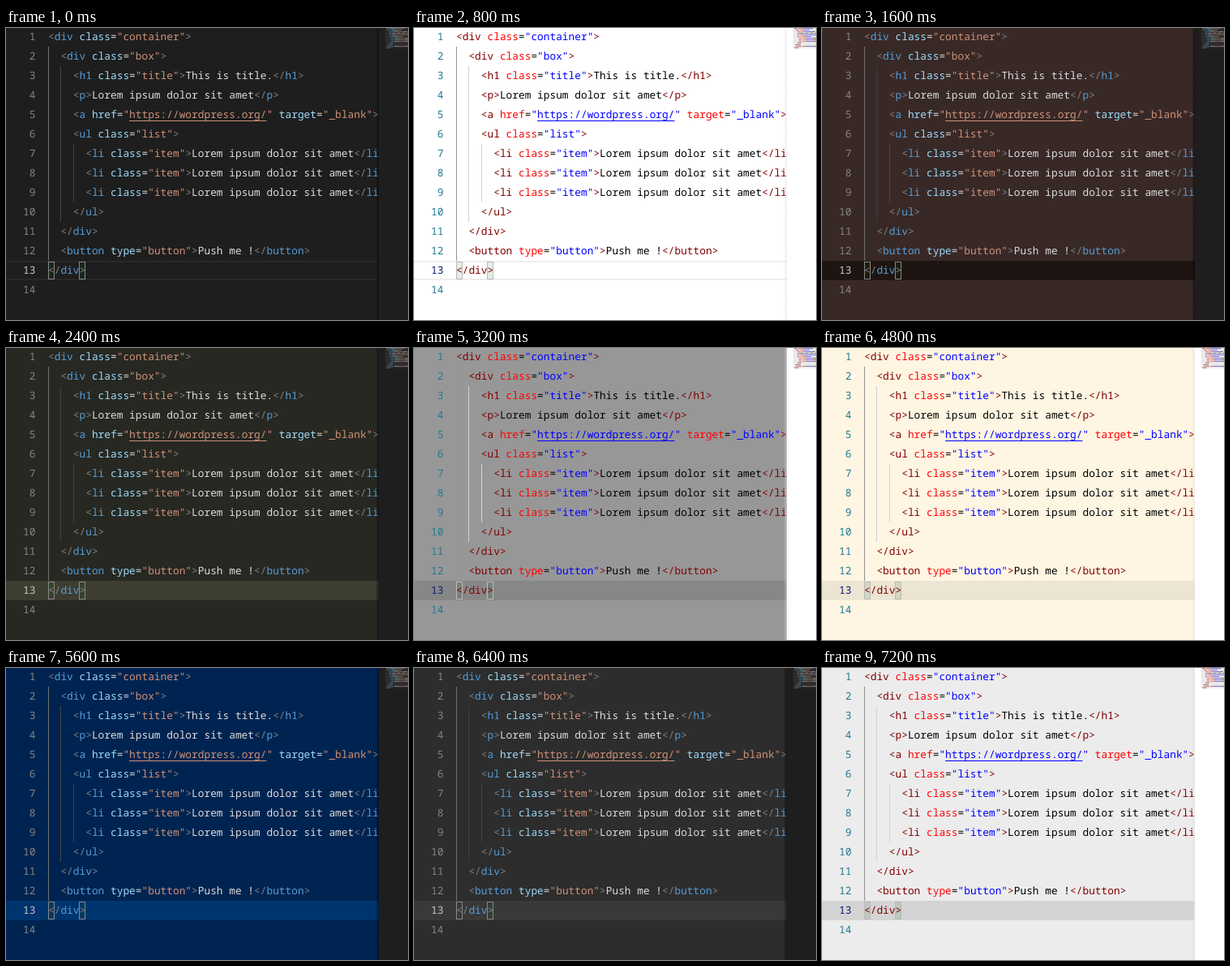
An HTML page that plays this animation: 496x360 px, repeating every 8000 ms.

```html
<!DOCTYPE html>
<html lang="en">
<head>
<meta charset="utf-8">
<title>Editor themes</title>
<style>
  html, body { margin: 0; width: 100%; height: 100%; overflow: hidden; }
  svg { display: block; width: 496px; height: 360px; animation: themes 8s step-end infinite; }
  text { font: 12.83px "Noto Sans Mono", "DejaVu Sans Mono", monospace; text-rendering: geometricPrecision; }

  .page { fill: var(--page); }
  .map { fill: var(--map); }
  .current { fill: var(--line); stroke: var(--edge); stroke-width: 2; }
  .guide { fill: var(--guide); }
  .guide.active { fill: var(--active-guide); }
  .match { fill: rgba(0, 100, 0, .1); stroke: var(--match); }
  .number { fill: var(--number); text-anchor: end; }
  .number.active { fill: var(--active-number); }
  .punct { fill: var(--punct); }
  .tag { fill: var(--tag); }
  .attr { fill: var(--attr); }
  .str { fill: var(--str); }
  .plain { fill: var(--plain); }
  .underline { fill: var(--str); }
  .slider { fill: #797979; opacity: .16; }
  .mini { opacity: .5; }
  .shade { stop-color: var(--shade); }

  @keyframes themes {
    0%, 20%, 30%, 50%, 70%, 80% {
      --map: #1e1e1e; --shade: #000; --guide: #404040; --active-guide: #707070; --match: #888;
      --number: #858585; --active-number: #c6c6c6;
      --punct: #808080; --tag: #569cd6; --attr: #9cdcfe; --str: #ce9178; --plain: #dcdcdc;
    }
    10%, 40%, 60%, 90%, 100% {
      --map: #fff; --shade: #ddd; --guide: #d3d3d3; --active-guide: #939393; --match: #b9b9b9;
      --number: #237893; --active-number: #0b216f;
      --punct: #800000; --tag: #800000; --attr: #f00; --str: #00f; --plain: #000;
    }
    0%   { --page: #1e1e1e; --line: #1e1e1e; --edge: #282828; }
    10%  { --page: #fff;    --line: #fff;    --edge: #eee; }
    20%  { --page: #382927; --line: #1e1512; --edge: #1e1512; }
    30%  { --page: #272822; --line: #3e3d32; --edge: #3e3d32; }
    40%  { --page: #979797; --line: #878787; --edge: #878787; }
    50%  { --page: #002b36; --line: #073642; --edge: #073642; }
    60%  { --page: #fef5e2; --line: #ece5d3; --edge: #ece5d3; }
    70%  { --page: #002451; --line: #00346e; --edge: #00346e; }
    80%  { --page: #2d2d2d; --line: #393939; --edge: #393939; }
    90%, 100% { --page: #ececec; --line: #d4d4d4; --edge: #d4d4d4; }
  }
</style>
</head>
<body>
<svg id="editor" viewBox="0 0 496 360">
  <defs>
    <clipPath id="code-area"><rect width="460" height="360"/></clipPath>
    <linearGradient id="shadow">
      <stop class="shade" stop-opacity="0"/>
      <stop class="shade" offset="1" stop-opacity=".5"/>
    </linearGradient>
  </defs>
</svg>
<script>
  const LEFT = 52, CHAR = 7.698, ROW = 24, CURRENT = 12;
  const item = '      <li class="item">Lorem ipsum dolor sit amet</li>';
  const lines = [
    '<div class="container">',
    '  <div class="box">',
    '    <h1 class="title">This is title.</h1>',
    '    <p>Lorem ipsum dolor sit amet</p>',
    '    <a href="https://wordpress.org/" target="_blank">',
    '    <ul class="list">',
    item, item, item,
    '    </ul>',
    '  </div>',
    '  <button type="button">Push me !</button>',
    '</div>',
    ''
  ];

  const rect = (name, x, y, w, h) =>
    `<rect class="${name}" x="${x}" y="${y}" width="${w}" height="${h}"/>`;
  const escapeText = s => s.replace(/&/g, '&amp;').replace(/</g, '&lt;');

  // Splits a line of markup into [class, text] pairs.
  function tokenize(source) {
    const tokens = [];
    for (const [, open, tag, attrs, text] of source.matchAll(/(<\/?)(\w+)([^>]*)>|([^<]+)/g)) {
      if (text) { tokens.push(['plain', text]); continue; }
      tokens.push(['punct', open], ['tag', tag]);
      for (const [part] of attrs.matchAll(/"[^"]*"|\w+|=|\s+/g)) {
        tokens.push([part[0] === '"' ? 'str' : /\w/.test(part) ? 'attr' : 'plain', part]);
      }
      tokens.push(['punct', '>']);
    }
    return tokens;
  }

  const column = n => LEFT + n * CHAR;
  let code = '', numbers = '', mini = '';

  lines.forEach((line, row) => {
    const baseline = row * ROW + 15;
    const indent = line.search(/\S|$/);
    const tokens = tokenize(line.trim());
    const spans = tokens.map(([name, s]) => `<tspan class="${name}">${escapeText(s)}</tspan>`);
    code += `<text x="${column(indent)}" y="${baseline}">${spans.join('')}</text>`;
    numbers += `<text class="number ${row === CURRENT ? 'active' : ''}" x="36.4" y="${baseline}">${row + 1}</text>`;

    let at = indent;
    for (const [name, s] of tokens) {
      for (const word of s.matchAll(/\S+/g)) {
        mini += rect(name, 469 + at + word.index, row * 2, word[0].length, 1);
      }
      at += s.length;
    }

    const link = line.match(/https:[^"]+/);
    if (link) code += rect('underline', column(link.index), baseline + 3, link[0].length * CHAR, 1);
  });

  const guide = (x, first, last, active = '') =>
    rect('guide ' + active, x, first * ROW - 1, 1, (last - first) * ROW);
  const lineTop = CURRENT * ROW - 1;
  const bracket = n => rect('match', Math.round(column(n)) + .5, lineTop + 1.5, 7, 21);

  document.getElementById('editor').insertAdjacentHTML('beforeend', `
    ${rect('page', 0, 0, 460, 360)}
    <g clip-path="url(#code-area)">
      ${rect('current', -2, lineTop + 1, 470, ROW - 2)}
      ${guide(52, 1, 12, 'active')}${guide(67, 2, 10)}${guide(83, 6, 9)}
      ${bracket(0)}${bracket(5)}
      ${numbers}${code}
      <rect x="456" width="4" height="360" fill="url(#shadow)"/>
    </g>
    ${rect('map', 460, 0, 36, 360)}
    ${rect('slider', 468, 0, 28, 25)}
    <g class="mini">${mini}</g>`);
</script>
</body>
</html>
```
